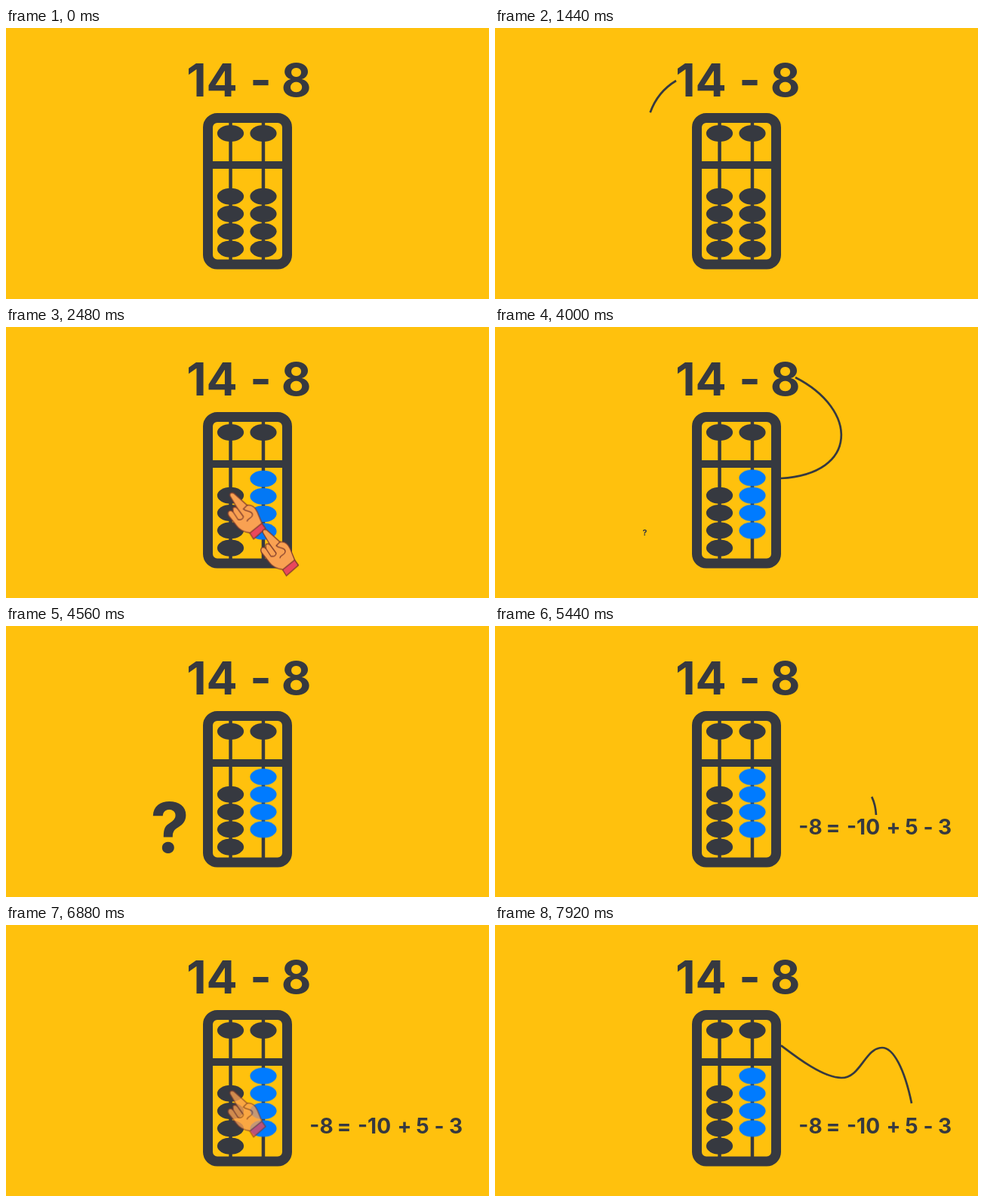
An HTML page for the animation above (8 s loop, 640 px wide and 360 px high).

```html
<!DOCTYPE html>
<html lang="en">
<head>
<meta charset="utf-8">
<title>Abacus subtraction</title>
<style>
  :root { --ink: #363940; --blue: #007bff; --loop: 8s linear infinite; }
  html, body { margin: 0; width: 100%; height: 100%; overflow: hidden; background: #ffc10d; }
  svg { display: block; width: 100%; height: 100%; fill: var(--ink); }
  text { font: 700 61px Inter, "Open Sans", sans-serif; text-anchor: middle; }

  .up   { animation: up var(--loop); }
  .both { animation: both var(--loop); }
  @keyframes up {
    0%, 21.5% { transform: none; fill: var(--ink); animation-timing-function: cubic-bezier(.33, 0, .67, 1); }
    32.5%, 100% { transform: translateY(-23.3px); fill: var(--blue); }
  }
  @keyframes both {
    0%, 21.5% { transform: none; fill: var(--ink); animation-timing-function: cubic-bezier(.33, 0, .67, 1); }
    32.5% { transform: translateY(-23.3px); fill: var(--blue); animation-timing-function: linear; }
    74.75% { transform: translateY(-23.3px); fill: var(--blue); animation-timing-function: cubic-bezier(.33, 0, .67, 1); }
    85.5%, 100% { transform: none; fill: var(--ink); }
  }

  .once  { animation: once var(--loop); }
  .twice { animation: twice var(--loop); }
  @keyframes once {
    0%, 20.5% { opacity: 0; }
    22.5%, 32.7% { opacity: 1; }
    35%, 100% { opacity: 0; }
  }
  @keyframes twice {
    0%, 20.5% { opacity: 0; }
    22.5%, 32.7% { opacity: 1; }
    35%, 74.5% { opacity: 0; }
    76.5%, 85.5% { opacity: 1; }
    88%, 100% { opacity: 0; }
  }

  /* Connectors are drawn from their start, then wiped from their start. */
  .line { fill: none; stroke: var(--ink); stroke-width: 2.7; stroke-dasharray: 1 2; stroke-dashoffset: 1.01; }
  .l1 { animation: l1 var(--loop); }
  .l2 { animation: l2 var(--loop); }
  .l3 { animation: l3 var(--loop); }
  .l4 { animation: l4 var(--loop); }
  @keyframes l1 {
    0%, 16.5% { stroke-dashoffset: 1.01; }
    21%, 21.5% { stroke-dashoffset: 0; }
    26.6%, 100% { stroke-dashoffset: -1.01; }
  }
  @keyframes l2 {
    0%, 44.4% { stroke-dashoffset: 1.01; }
    49.2%, 51.6% { stroke-dashoffset: 0; }
    57%, 100% { stroke-dashoffset: -1.01; }
  }
  @keyframes l3 {
    0%, 67.2% { stroke-dashoffset: 1.01; }
    72.1%, 74.5% { stroke-dashoffset: 0; }
    79.5%, 100% { stroke-dashoffset: -1.01; }
  }
  @keyframes l4 {
    0%, 91.5% { stroke-dashoffset: 1.01; }
    96%, 98.6% { stroke-dashoffset: 0; }
    100% { stroke-dashoffset: -.28; }
  }

  .question { font-size: 92px; transform-origin: 196px 274px; animation: question var(--loop); }
  @keyframes question {
    0%, 49.5% { transform: scale(0); opacity: 1; animation-timing-function: cubic-bezier(.25, .4, .5, 1); }
    56.8%, 61.6% { transform: none; opacity: 1; animation-timing-function: linear; }
    65%, 100% { transform: none; opacity: 0; }
  }
  .formula { font-size: 28px; animation: formula var(--loop); }
  @keyframes formula {
    0%, 61.6% { opacity: 0; }
    66%, 100% { opacity: 1; }
  }
</style>
</head>
<body>
<svg viewBox="0 0 640 360">
  <defs>
    <ellipse id="bead" rx="17.6" ry="11"/>
    <g id="hand" stroke="#7d3b2c" stroke-width="1.3" stroke-linejoin="round" stroke-linecap="round">
      <path fill="#f9a152" d="M-.5 1C-2.5-4 3.5-5 6.5-1L22 13C28 12 33 16 35.500 22L42 38L27 50C18 49 11 45 7 39L-2.500 27C-5 21-.5 18 3.500 22L3 17C4 15 7 15 9 17Z"/>
      <path fill="none" d="M3.500 22L10 32M9 17L17 28M22 13L17 18C21 22 28 20 29 25C30 30 23 30 22 34M10 32C14 33 17 31 17 28"/>
      <path fill="#e9485c" d="M25.500 50L41.500 37L46.500 44L30.500 58Z"/>
    </g>
  </defs>

  <text y="91"><tspan x="273">14</tspan><tspan x="337.500">-</tspan><tspan x="384.500">8</tspan></text>

  <path class="line l1" pathLength="1" d="M240 70C190 100 180 186 262 186"/>
  <path class="line l2" pathLength="1" d="M398 67C482 110 482 195 379 201"/>
  <path class="line l3" pathLength="1" d="M505 251C502 195 445 186 379 186"/>
  <path class="line l4" pathLength="1" d="M556 259C547 200 530 163 513 163C490 163 485 203 459 203C435 203 400 176 379 160"/>

  <rect x="267.500" y="119.500" width="105" height="194.500" rx="12.500" fill="none" stroke="#363940" stroke-width="13"/>
  <path d="M270 177h100v10h-100zM295.300 122h4.500v190h-4.500zM338.700 122h4.500v190h-4.500z"/>
  <use href="#bead" x="297.500" y="140"/>
  <use href="#bead" x="341" y="140"/>
  <use href="#bead" x="297.500" y="247"/>
  <use href="#bead" x="297.500" y="270.300"/>
  <use href="#bead" x="297.500" y="293.600"/>
  <g class="both"><use href="#bead" x="297.500" y="223.700"/></g>
  <g class="up">
    <use href="#bead" x="341" y="223.700"/>
    <use href="#bead" x="341" y="247"/>
    <use href="#bead" x="341" y="270.300"/>
    <use href="#bead" x="341" y="293.600"/>
  </g>

  <text class="question" x="217" y="301">?</text>
  <text class="formula" y="277"><tspan x="418">-8</tspan><tspan x="448">=</tspan><tspan x="488">-10</tspan><tspan x="528">+</tspan><tspan x="552">5</tspan><tspan x="574">-</tspan><tspan x="596">3</tspan></text>

  <g class="both"><use class="twice" href="#hand" x="297.500" y="223.700"/></g>
  <g class="up"><use class="once" href="#hand" x="341" y="294.600"/></g>
</svg>
</body>
</html>
```
